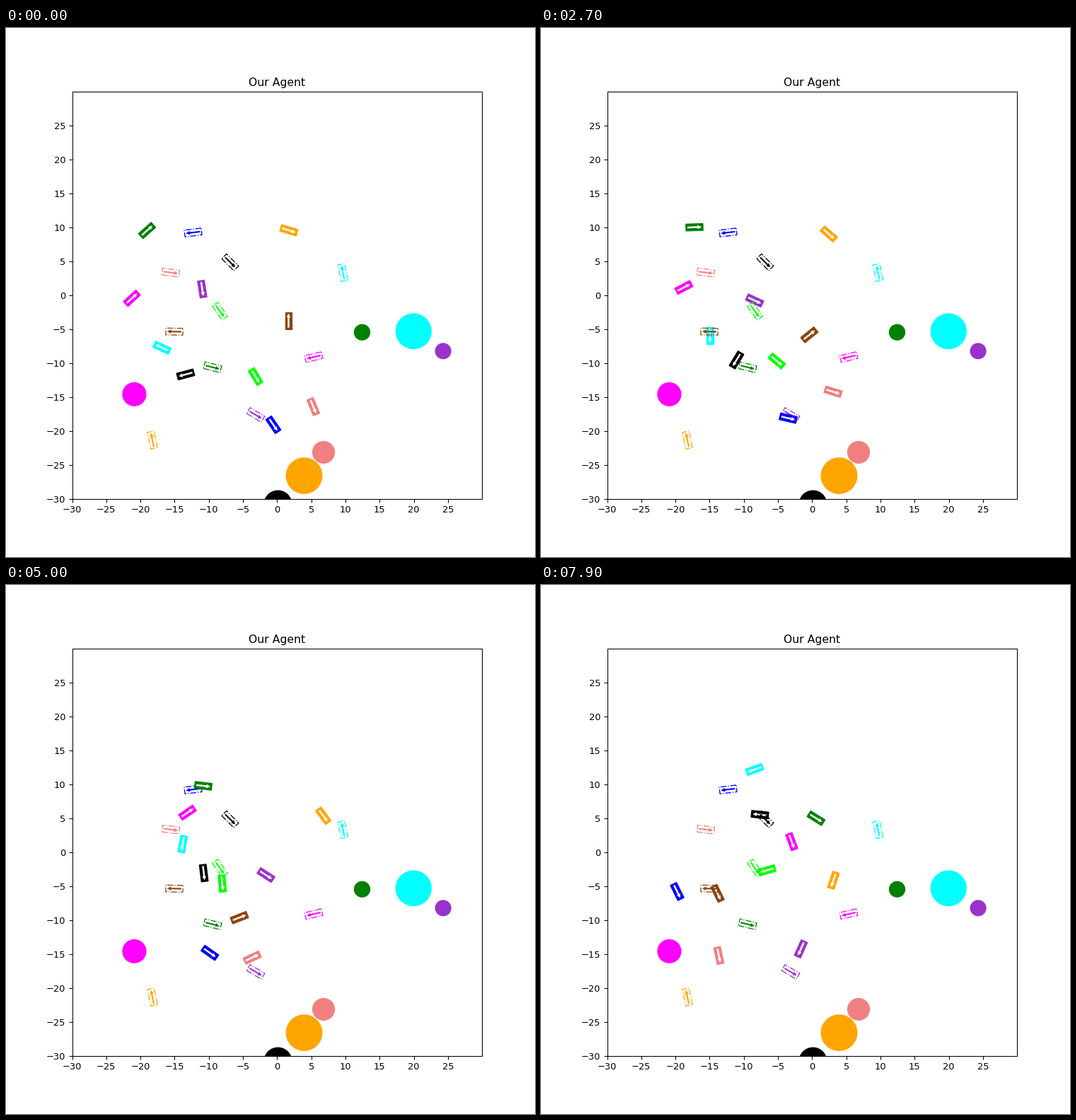
Write a matplotlib script that moves like this. It is 748 px wide and 748 px high and loops after 8 s.

```python
import numpy as np
import matplotlib.pyplot as plt
from matplotlib.animation import FuncAnimation
from matplotlib.patches import Circle, FancyArrow, Polygon

FRAMES, INTERVAL = 80, 100
LENGTH, WIDTH, ARROW = 2.5, 1.0, 2.0
KEYS = [0, 26, 58, 78]  # steps at which the poses are given
DRAG = 0.0133


def travelled(step):
    """Distance after pulling away from rest with constant thrust and drag."""
    return step - (1 - np.exp(-DRAG * step)) / DRAG


def direction(deg):
    return np.array([np.cos(np.radians(deg)), np.sin(np.radians(deg))])


def box(x, y, deg):
    """Corners of a car centred at x, y, starting at the rear right."""
    fwd = direction(deg) * LENGTH / 2
    side = direction(deg + 90) * WIDTH / 2
    return np.array([x, y]) + [-fwd - side, fwd - side, fwd + side, side - fwd]


def arrow_args(x, y, deg):
    dx, dy = ARROW * direction(deg)
    return dict(x=x - dx / 2, y=y - dy / 2, dx=dx, dy=dy)


def make_arrow(pose, color, width):
    return FancyArrow(**arrow_args(*pose), width=width, head_width=0.5,
                      head_length=0.5, length_includes_head=True,
                      fc=color, ec=color, lw=0.4)


def drive(a, b, u):
    """Pose at part u of a smooth drive, forwards or reversing, from a to b."""
    p, q = np.array(a[:2]), np.array(b[:2])
    chord, mean = q - p, (a[2] + b[2]) / 2
    gear = np.sign(chord @ direction(mean))
    reach = gear * np.hypot(*chord)
    x, y = ((1 + 2 * u) * (1 - u) ** 2 * p + u * u * (3 - 2 * u) * q
            + u * (1 - u) * reach * ((1 - u) * direction(a[2]) - u * direction(b[2])))
    # the heading, averaged over the drive, follows the chord
    course = np.degrees(np.arctan2(gear * chord[1], gear * chord[0]))
    bend = (course - mean + 180) % 360 - 180
    return x, y, a[2] + u * (b[2] - a[2]) + 6 * u * (1 - u) * bend


class Car:
    def __init__(self, ax, color, goal, *poses):
        self.poses = poses
        self.body = ax.add_patch(Polygon(box(*poses[0]), fc=color, ec=color, lw=1))
        self.arrow = ax.add_patch(make_arrow(poses[0], "white", 0.2))
        ax.add_patch(Polygon(box(*goal), fill=False, ec=color, lw=1, ls="-."))
        ax.add_patch(make_arrow(goal, color, 0.16))

    def move(self, step):
        i = min(np.searchsorted(KEYS, step, side="right"), len(KEYS) - 1)
        s0, s, s1 = (travelled(t) for t in (KEYS[i - 1], step, KEYS[i]))
        pose = drive(self.poses[i - 1], self.poses[i], (s - s0) / (s1 - s0))
        self.body.set_xy(box(*pose))
        self.arrow.set_data(**arrow_args(*pose))


fig, ax = plt.subplots(figsize=(8, 8), dpi=93.5)
ax.set(xlim=(-30, 30), ylim=(-30, 30), title="Our Agent",
       xticks=range(-30, 30, 5), yticks=range(-30, 30, 5))

for color, x, y, r in [("magenta", -20.9, -14.6, 1.7), ("green", 12.44, -5.47, 1.14),
                       ("cyan", 19.97, -5.32, 2.58), ("darkorchid", 24.3, -8.24, 1.13),
                       ("lightcoral", 6.8, -23.15, 1.6), ("orange", 3.95, -26.6, 2.62),
                       ("black", 0.12, -30.8, 2.0)]:
    ax.add_patch(Circle((x, y), r, color=color))

# goal pose, then the poses at the key steps: x, y, heading in degrees
cars = [
    Car(ax, "orange", (-18.25, -21.35, 102), (1.72, 9.55, -17),
        (2.45, 9.0, -41), (7.36, 3.04, -103), (3.12, -4.15, -108)),
    Car(ax, "darkorchid", (-3.14, -17.64, -31), (-10.96, 0.9, -81),
        (-8.42, -0.79, -25), (-0.09, -5.85, -90), (-1.64, -14.25, -114)),
    Car(ax, "blue", (-12.3, 9.23, 187), (-0.55, -19.1, -56),
        (-3.5, -18.12, -13), (-12.92, -12.77, -31), (-19.75, -5.8, -64)),
    Car(ax, "cyan", (9.64, 3.32, 102), (-16.85, -7.74, 155),
        (-14.94, -5.95, 270), (-13.49, 4.83, 272), (-8.42, 12.18, 200)),
    Car(ax, "magenta", (5.35, -9.12, 193), (-21.25, -0.46, 43),
        (-18.77, 1.14, 28), (-9.92, 6.81, -5), (-2.99, 1.55, -70)),
    Car(ax, "lightcoral", (-15.56, 3.33, -7), (5.29, -16.42, -68),
        (3.07, -14.23, -17), (-7.07, -16.9, 16), (-13.65, -15.23, -78)),
    Car(ax, "saddlebrown", (-15.04, -5.37, 179), (1.67, -3.75, 90),
        (-0.4, -5.85, 39), (-8.11, -9.5, -34), (-13.85, -6.07, -64)),
    Car(ax, "green", (-9.45, -10.62, -14), (-19.03, 9.52, 42),
        (-17.22, 10.0, 2), (-7.59, 9.21, -13), (0.58, 5.0, -32)),
    Car(ax, "lime", (-8.37, -2.36, -55), (-3.14, -12.0, -59),
        (-5.16, -9.7, -40), (-7.13, -2.77, -160), (-6.61, -2.68, -164)),
    Car(ax, "black", (-6.87, 4.84, -45), (-13.39, -11.68, 195),
        (-11.06, -9.55, 239), (-10.59, 0.3, 254), (-7.64, 5.52, 174)),
]


def draw(frame):
    for car in cars:
        car.move(max(0, frame - 1))
    return []


anim = FuncAnimation(fig, draw, frames=FRAMES, interval=INTERVAL,
                     repeat=True, repeat_delay=0)
plt.show()
```
